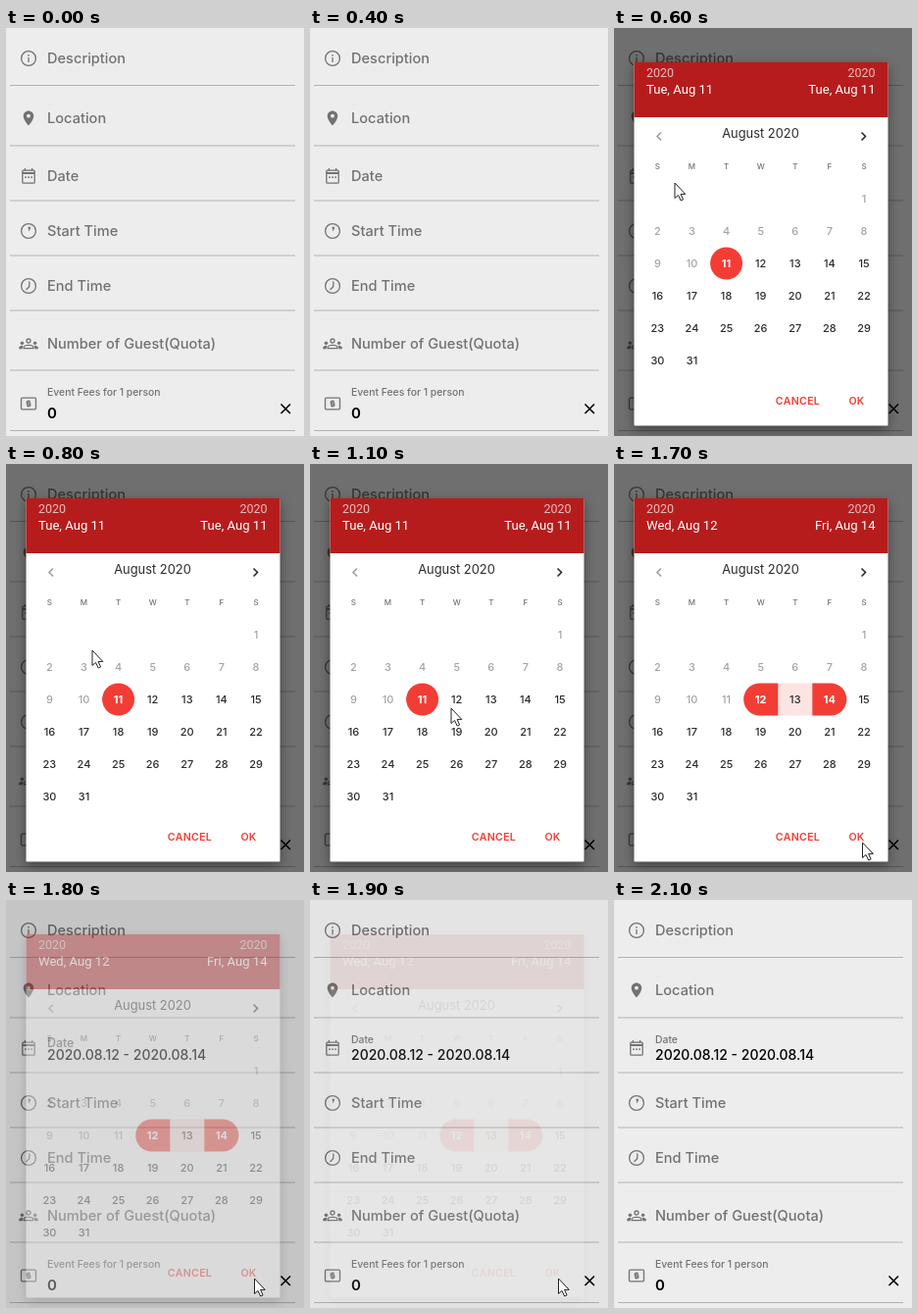
Animation, 304 px wide and 416 px high, one loop 2500 ms. Source, as an HTML page:

```html
<!DOCTYPE html>
<html lang="en">
<head>
<meta charset="utf-8">
<title>Event form</title>
<style>
html, body { margin: 0; width: 100%; height: 100%; overflow: hidden; background: #ededed; }
svg { display: block; width: 304px; height: 416px; font-family: Inter, "Open Sans", sans-serif; font-weight: 500; }
.roboto { font-family: Roboto, sans-serif; font-weight: 400; }
.icon { fill: none; stroke: #727272; stroke-width: 1.3; }
.icon .solid { fill: #727272; stroke: none; }
.card { filter: drop-shadow(0 4px 6px rgba(0, 0, 0, .4)); }
</style>
</head>
<body>
<svg id="stage" viewBox="0 0 304 416">
  <rect width="304" height="416" fill="#ededed"/>
  <g id="form"></g>
  <rect id="shade" width="304" height="416"/>
  <g id="dialog">
    <rect class="card" x="20.5" y="35" width="259" height="370.5" rx="1" fill="#fff"/>
    <rect x="20.5" y="35" width="259" height="56" fill="#b71c1c"/>
    <g id="header"></g>
    <g id="marks"></g>
    <g id="days"></g>
    <g fill="none" stroke-width="1.5">
      <path d="M48 106.500l-4 4 4 4" stroke="#999"/>
      <path d="M252.500 106.500l4 4-4 4" stroke="#222"/>
    </g>
  </g>
  <path d="M280.500 383.500l9.500 9.500m0-9.500l-9.500 9.500" stroke="#000" stroke-width="1.600"/>
  <path id="cursor" d="M0 0V15.500L3.500 12.400 6.200 18 8.600 16.900 6.100 11.400H10.800Z" fill="#fff" stroke="#222" stroke-width="1" stroke-linejoin="round"/>
</svg>
<script>
const $ = id => document.getElementById(id);
const GREY = '#727272', RED = '#f23d35', INK = '#2b2b2b';

// y is the middle of the capitals
const text = (s, x, y, size, fill, extra = '') =>
  `<text x="${x}" y="${y + size * .36}" font-size="${size}" fill="${fill}" ${extra}>${s}</text>`;
const mid = 'text-anchor="middle"';

// Form
const clock = hand => `<circle r="7.400"/>${hand}`;
const icons = {
  info: '<circle r="7.400"/><path d="M0-4v1.700M0-1v5"/>',
  pin: '<path class="solid" fill-rule="evenodd" d="M0-7.500C-3-7.500-5.300-5.200-5.300-2.300-5.300 1.700 0 7.500 0 7.500S5.300 1.700 5.300-2.300C5.300-5.200 3-7.500 0-7.500ZM0-4.200a1.900 1.900 0 1 1 0 3.800 1.900 1.900 0 1 1 0-3.800Z"/>',
  calendar: '<rect x="-6.200" y="-5.800" width="12.400" height="13" rx="1"/><path d="M-6-3H6" stroke-width="2"/><path d="M-3.600-8v2.500M3.600-8v2.500M-4 1.200h2M-1 1.200h2M2 1.200h2"/>',
  start: clock('<path class="solid" d="M-.4-4.600Q1.400-4.600 2.400-3.600L.2.6Z"/>'),
  end: clock('<path d="M.8-4.500V.5L-2.500 4"/>'),
  group: '<circle cy="-3" r="2"/><path d="M-4.800 4.600V3.300C-4.800.6 4.800.6 4.800 3.300V4.600Z"/><circle class="solid" cx="-6.600" cy="-.8" r="1.700"/><circle class="solid" cx="6.600" cy="-.8" r="1.700"/><path class="solid" d="M-9.800 5.200V3.500Q-8.800 1.600-5.800 1.700L-6.300 5.200ZM9.800 5.200V3.500Q8.800 1.600 5.800 1.700L6.300 5.200Z"/>',
  money: '<rect x="-7.500" y="-5.800" width="15" height="11.600" rx="1"/><path d="M2-2H-1.700V0H1.700V2H-2M0-3.700V-2M0 2V3.700"/>'
};
const rows = [
  ['info', 31, 58.5, 'Description'],
  ['pin', 92, 120, 'Location'],
  ['calendar', 151, 176, 'Date'],
  ['start', 207, 232, 'Start Time'],
  ['end', 263, 288, 'End Time'],
  ['group', 322, 349, 'Number of Guest(Quota)'],
  ['money', 383, 410.5, '']
];
const formBase = rows.map(([icon, y, line, label]) =>
  `<g class="icon" transform="translate(23 ${y})">${icons[icon]}</g>` +
  `<path d="M4 ${line}H295" stroke="#b3b3b3" stroke-width="1.200"/>` +
  (label === 'Date' ? '' : text(label, 42, y, 14.6, GREY))).join('') +
  text('Event Fees for 1 person', 42, 371, 10.4, GREY) +
  text('0', 42, 392.5, 15, '#000', 'font-weight="600"');

function drawForm(t) {
  const filled = t >= 1800, lifting = t < 1900;
  const label = !filled ? [151, 14.6] : lifting ? [146, 12.4] : [142, 10.4];
  $('form').innerHTML = formBase + text('Date', 42, ...label, GREY) +
    (filled ? text('2020.08.12 - 2020.08.14', 42, 158, 14, '#000') : '');
}

// Calendar: 1 August 2020 is a Saturday
const colX = c => 44.4 + c * 35.1;
const WEEK_Y = 240;

function drawCalendar(first, last) {
  const name = d => `${['Tue', 'Wed', 'Thu', 'Fri'][d - 11]}, Aug ${d}`;
  const head = (d, x, anchor) => {
    const extra = `class="roboto" text-anchor="${anchor}"`;
    return text('2020', x, 45, 12.5, '#e9bcbc', extra) + text(name(d), x, 62.5, 13.1, '#fff', extra);
  };
  $('header').innerHTML = head(first, 33, 'start') + head(last, 266.5, 'end');

  const x1 = colX(first - 9), x2 = colX(last - 9), top = WEEK_Y - 16.5;
  const cap = (x, sweep, side) =>
    `<path d="M${x + side} ${top}H${x - side}a16.500 16.500 0 0 ${sweep} 0 33H${x + side}Z" fill="${RED}"/>`;
  $('marks').innerHTML = first === last
    ? `<circle cx="${x1}" cy="${WEEK_Y}" r="16.500" fill="${RED}"/>`
    : `<rect x="${x1 + 17.5}" y="${top}" width="${x2 - x1 - 35}" height="33" fill="#fde4e3"/>` +
      `<g>${cap(x1 + 8.3, 0, 9.3)}${cap(x2 - 8.3, 1, -9.3)}</g>`;

  let s = text('August 2020', 149.5, 107.5, 12.9, INK, mid + ' font-weight="400"');
  [...'SMTWTFS'].forEach((d, c) => s += text(d, colX(c), 141, 8, GREY, mid));
  for (let d = 1; d <= 31; d++) {
    const cell = d + 5, picked = d === first || d === last;
    const fill = picked ? '#fff' : d < first ? '#a3a3a3' : INK;
    s += text(d, colX(cell % 7), 174 + 33 * Math.floor(cell / 7), 11, fill, mid + (picked ? ' font-weight="700"' : ''));
  }
  const action = 'text-anchor="middle" font-weight="600" letter-spacing=".3"';
  $('days').innerHTML = s + text('CANCEL', 187.5, 380.5, 10.6, RED, action) + text('OK', 247.5, 380.5, 10.6, RED, action);
}

// Pointer path: time, x, y
const path = [
  [600, 62, 158], [700, 66, 164], [800, 88, 190], [900, 116, 222], [1000, 138, 243], [1100, 144, 249],
  [1200, 146, 246], [1300, 180, 248], [1400, 213, 246], [1500, 214, 246], [1600, 236, 322], [1700, 253.5, 386]
];
// Dialog fade: time, shade, dialog opacity
const fade = [[0, 0, 0], [600, .53, 1], [1800, .17, .36], [1900, .04, .08], [2000, 0, 0]];
const at = (table, t) => table.filter(row => row[0] <= t).pop();

function draw(t) {
  drawForm(t);
  const [, shade, dialog] = at(fade, t);
  $('shade').setAttribute('opacity', shade);
  $('dialog').setAttribute('opacity', dialog);
  drawCalendar(t < 1200 ? 11 : 12, t < 1200 ? 11 : t < 1500 ? 12 : 14);

  const visible = t >= 600 && t < 2000;
  $('cursor').setAttribute('visibility', visible ? 'visible' : 'hidden');
  if (visible) {
    const [, x, y] = at(path, t);
    $('cursor').setAttribute('transform', `translate(${x} ${y})`);
  }
}

const LOOP = 2500, STEP = 100;
const begin = performance.now();
let shown = -1;
function tick() {
  const t = Math.floor((performance.now() - begin) % LOOP / STEP) * STEP;
  if (t !== shown) draw(shown = t);
  requestAnimationFrame(tick);
}
tick();
</script>
</body>
</html>
```
